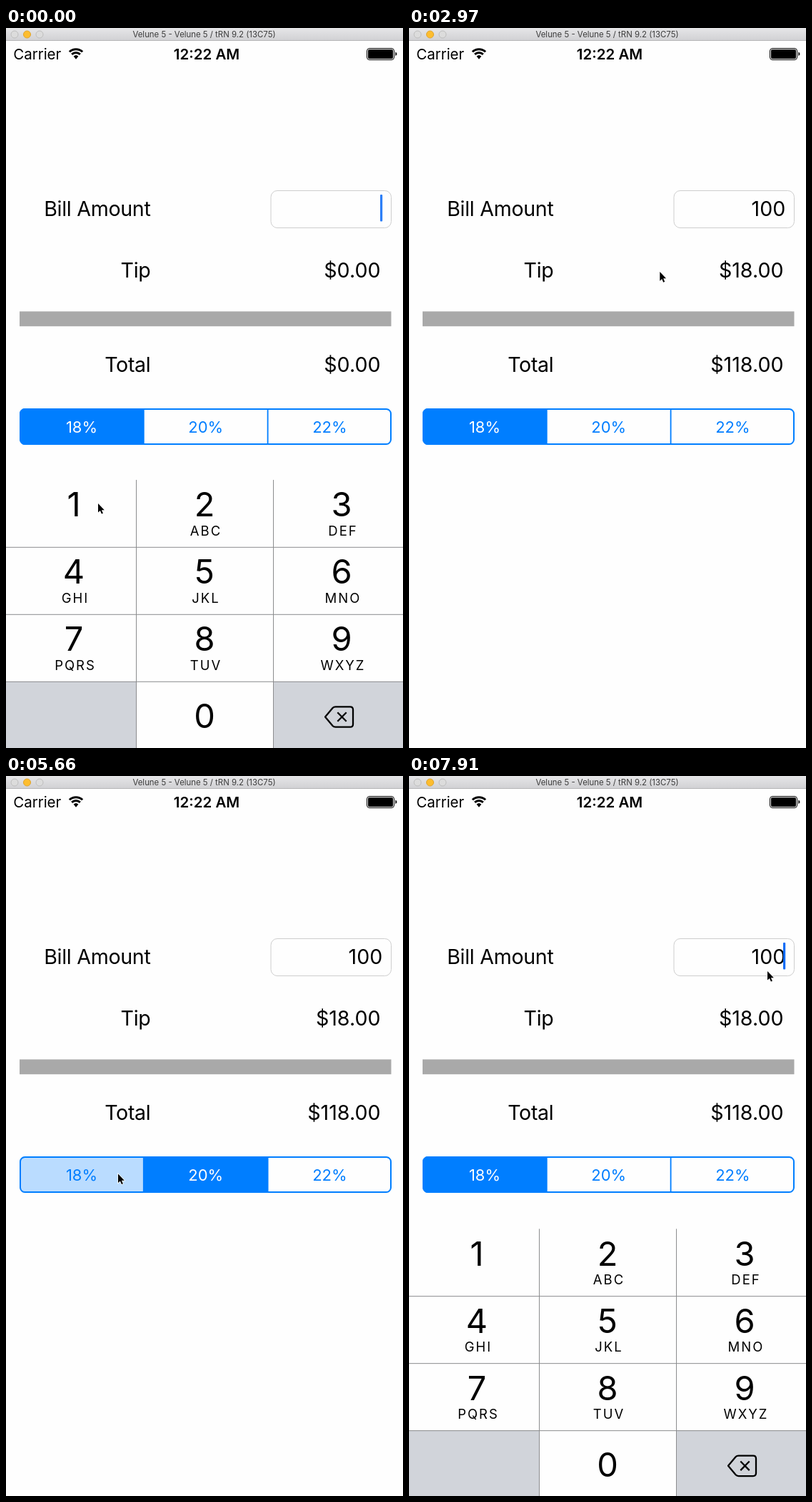
These frames come from a looping animation (556x1007 px, 8 s). An HTML page:

```html
<!DOCTYPE html>
<html lang="en">
<head>
<meta charset="utf-8">
<title>Tip calculator</title>
<style>
html, body { margin: 0; width: 100%; height: 100%; overflow: hidden; background: #fefefe; }
svg { display: block; width: 556px; height: 1007px; font-family: Inter, "Liberation Sans", sans-serif; }
.label { font-size: 28.6px; letter-spacing: -.3px; text-anchor: end; }
.amount { font-size: 28.6px; text-anchor: end; }
.status { font-size: 20.5px; }
.mid { text-anchor: middle; }
.seg { font-size: 22px; }
.digit { font-size: 47px; }
.letters { font-size: 18.5px; letter-spacing: 2px; }
</style>
</head>
<body>
<svg viewBox="0 0 556 1007">
  <defs>
    <linearGradient id="chrome" x2="0" y2="1">
      <stop stop-color="#e6e6e8"/><stop offset="1" stop-color="#d0d0d3"/>
    </linearGradient>
    <clipPath id="round"><rect x="19" y="532" width="521" height="51" rx="7.5"/></clipPath>
  </defs>
  <rect width="556" height="1007" fill="#fefefe"/>

  <rect width="556" height="18" fill="url(#chrome)"/>
  <rect y="17" width="556" height="1" fill="#b6b6b8"/>
  <g fill="#dcdcdc" stroke="#bebebe">
    <circle cx="12" cy="9" r="5"/>
    <circle cx="29.5" cy="9" r="5" fill="#fdbd2f" stroke="#e0a32a"/>
    <circle cx="47" cy="9" r="5"/>
  </g>
  <text class="mid" x="277.5" y="13" font-size="11.4" fill="#3c3c3c">Velune 5 - Velune 5 / tRN 9.2 (13C75)</text>

  <text class="status" x="10.2" y="44">Carrier</text>
  <g id="wifi" fill="none" stroke="#000" stroke-width="3"></g>
  <text class="status mid" x="281" y="44" font-weight="600">12:22 AM</text>
  <rect x="505.5" y="28.5" width="38" height="16" rx="3.5" fill="none" stroke="#000"/>
  <rect x="507" y="30" width="35" height="13" rx="2"/>
  <path d="M545.3 33.5q2 .8 2 2.8t-2 2.8z"/>

  <text class="label" x="202.5" y="263">Bill Amount</text>
  <text class="label" x="202.5" y="348.5">Tip</text>
  <text class="label" x="202.5" y="481">Total</text>
  <rect x="371" y="227.5" width="168.5" height="52" rx="9" fill="#fefefe" stroke="#cecece"/>
  <text class="amount" id="bill" x="527.3" y="262.5"></text>
  <rect id="caret" x="524" y="233" width="3.2" height="37.5" rx="1" fill="#0f6cf6"/>
  <text class="amount" id="tip" x="524.5" y="348.5"></text>
  <rect x="19" y="396.4" width="520.5" height="20.8" fill="#a9a9a9"/>
  <text class="amount" id="total" x="524.5" y="481"></text>

  <g id="segments" clip-path="url(#round)"></g>
  <g fill="none" stroke="#007eff" stroke-width="2">
    <path d="M192.8 533v49M366.6 533v49" stroke-width="1.8"/>
    <rect x="20" y="533" width="519" height="49" rx="6.5"/>
  </g>

  <g id="pad"></g>
  <path id="mouse" d="M0 0V12.6L2.9 9.9 4.9 14.6 6.9 13.7 4.9 9.2H8.8Z" stroke="#fff" stroke-width="1.4" paint-order="stroke"/>
</svg>
<script>
const LOOP = 8000, FRAME = 148.8, BLUE = '#007eff', GREY = '#d1d4da', WHITE = '#fefefe';
const el = id => document.getElementById(id);
const clamp = v => Math.min(1, Math.max(0, v));
const money = n => '$' + n.toFixed(2);

// What the user does, in ms.
const taps = [{ t: 240, key: '1' }, { t: 1120, key: '0' }, { t: 1400, key: '0' }];
const picks = [{ t: -LOOP, seg: 0 }, { t: 3579, seg: 1 }, { t: 4400, seg: 2 }, { t: 5190, seg: 1 }, { t: 5614, seg: 0 }];
const BLUR = 2490, FOCUS = 7520;
const mouseStart = [129, 665];
// Each leg: depart, arrive, x, y.
const legs = [
  [320, 890, 291, 973], [1500, 2090, 391, 104], [2090, 2230, 389.5, 128],
  [2680, 3270, 313.5, 552], [3900, 4390, 466, 556], [4900, 5180, 300, 557],
  [5360, 5600, 157, 556.5], [5690, 6090, 344, 191], [6110, 6390, 349, 163],
  [6750, 7130, 512, 281], [7140, 7290, 502, 273]
];

function mouseAt(t) {
  let [x, y] = mouseStart;
  for (const [from, to, toX, toY] of legs) {
    const p = clamp((t - from) / (to - from)), k = p * p * (3 - 2 * p);
    x += (toX - x) * k;
    y += (toY - y) * k;
  }
  return `translate(${x} ${y})`;
}

function padOffset(t) {
  const decay = from => Math.exp((from - t) / 65);
  if (t < BLUR) return 0;
  return 378 * (t < FOCUS ? 1 - decay(BLUR) : decay(FOCUS));
}

// The caret stays solid for half a second after input, then fades.
function caretAlpha(t) {
  if (t >= BLUR && t < FOCUS) return 0;
  const last = Math.max(-530, ...[...taps.map(tap => tap.t), FOCUS].filter(v => v <= t));
  return clamp((750 - (t - last)) / 250);
}

// The new segment fills first, then the old one clears.
function segAlpha(i, t) {
  const now = picks.findLastIndex(pick => pick.t <= t), p = (t - picks[now].t) / 150;
  if (picks[now].seg === i) return clamp(p);
  return now && picks[now - 1].seg === i ? clamp(2 - p) : 0;
}

function arc(r) {
  const dx = r * Math.sin(.74), y = 43.3 - r * Math.cos(.74);
  return `M${98 - dx} ${y}A${r} ${r} 0 0 1 ${98 + dx} ${y}`;
}
el('wifi').innerHTML = `<path d="${arc(13.6)}${arc(8.7)}"/>` +
  `<path d="${arc(5)}L98 43.8Z" fill="#000" stroke="none"/>`;

el('segments').innerHTML = [0, 1, 2].map(i =>
  `<rect x="${19 + 173.7 * i}" y="532" width="173.7" height="51" fill="${BLUE}"/>` +
  `<text class="seg mid" x="${106 + 173.7 * i}" y="565.5">${18 + 2 * i}%</text>`).join('');
const segFills = [...el('segments').querySelectorAll('rect')];
const segTexts = [...el('segments').querySelectorAll('text')];

const colX = [0, 182, 374, 556], digitX = [95, 278, 470];
const letters = ['', 'ABC', 'DEF', 'GHI', 'JKL', 'MNO', 'PQRS', 'TUV', 'WXYZ'];
function key(name, i) {
  const col = i % 3, y = 632 + 94 * Math.floor(i / 3), x = colX[col], bottom = i > 8;
  return `<rect data-key="${name}" x="${x}" y="${y}" width="${colX[col + 1] - x}" height="94" fill="${bottom && col !== 1 ? GREY : WHITE}"/>` +
    `<text class="digit mid" x="${digitX[col]}" y="${y + (bottom ? 64.6 : 51.2)}">${name}</text>` +
    `<text class="letters mid" x="${digitX[col] + 2}" y="${y + 78}">${letters[i] || ''}</text>`;
}
el('pad').innerHTML = [1, 2, 3, 4, 5, 6, 7, 8, 9, '', 0, ''].map(key).join('') +
  [1, 2, 3].map(row => `<rect y="${631.8 + 94 * row}" width="556" height="1" fill="#8b8c8e"/>`).join('') +
  [182, 374].map(x => `<rect x="${x}" y="632" width="1" height="376" fill="#8b8c8e"/>`).join('') +
  `<path d="M447 963.5L457.5 951Q459 949.3 461.5 949.3H482Q486 949.3 486 953.3V973.7Q486 977.7 482 977.7H461.5Q459 977.7 457.5 976Z
    M464.3 957.2L476.7 969.8M476.7 957.2L464.3 969.8" fill="none" stroke="#000" stroke-width="2.3" stroke-linejoin="round"/>`;
const pressable = [...el('pad').querySelectorAll('[data-key="1"],[data-key="0"]')];

function draw(t) {
  const bill = Number(taps.filter(tap => tap.t <= t).map(tap => tap.key).join(''));
  const rate = 18 + 2 * picks.findLast(pick => pick.t <= t).seg;
  const tip = bill * rate / 100;
  el('bill').textContent = bill || '';
  el('tip').textContent = money(tip);
  el('total').textContent = money(bill + tip);
  el('caret').setAttribute('opacity', caretAlpha(t));
  segFills.forEach((fill, i) => {
    const alpha = segAlpha(i, t);
    fill.setAttribute('fill-opacity', alpha);
    segTexts[i].setAttribute('fill', alpha > .5 ? WHITE : BLUE);
  });
  const held = taps.find(tap => t < tap.t && t > tap.t - 130);
  for (const k of pressable) k.setAttribute('fill', held && k.dataset.key === held.key ? GREY : WHITE);
  el('pad').setAttribute('transform', `translate(0 ${padOffset(t)})`);
  el('mouse').setAttribute('transform', mouseAt(t));
}

// The picture advances in even steps, like a screen recording.
const start = performance.now();
function tick() {
  const t = (performance.now() - start) % LOOP;
  draw(Math.floor((t + 10) / FRAME) * FRAME);
  requestAnimationFrame(tick);
}
tick();
</script>
</body>
</html>
```
